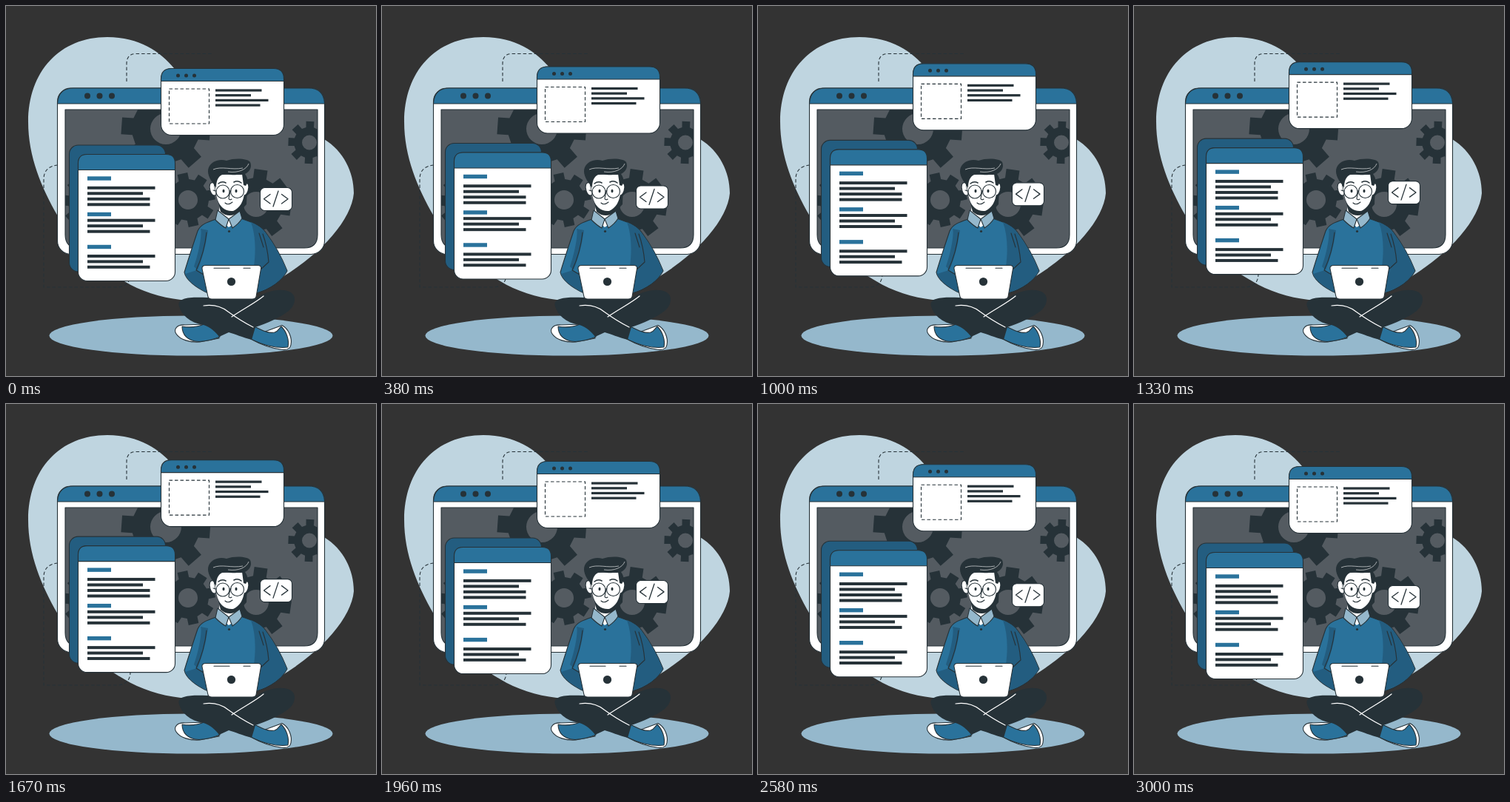
An HTML page for the animation above (3040 ms loop, 500 px wide and 500 px high).

```html
<!DOCTYPE html>
<html lang="en">
<head>
<meta charset="utf-8">
<title>Developer at work</title>
<style>
  html, body { margin: 0; width: 100%; height: 100%; overflow: hidden; background: #333; }
  svg { display: block; width: 100vw; height: 100vh; }
  .ink { fill: #263238; }
  .blue { fill: #2a729b; }
  .deep { fill: #235d80; }
  .pale { fill: #95b8cc; }
  .white { fill: #fff; }
  .line { fill: none; }
  .edge, .line { stroke: #263238; stroke-width: 1.1; stroke-linecap: round; stroke-linejoin: round; }
  .dash { fill: none; stroke: #263238; stroke-width: 1.1; stroke-dasharray: 4.5 3; }
</style>
</head>
<body>
<svg viewBox="0 0 500 500">
  <defs>
    <clipPath id="screen"><path d="M80 140H421V309Q421 327 403 327H98Q80 327 80 309Z"/></clipPath>
  </defs>

  <!-- backdrop -->
  <path fill="#bfd5e0" d="M30 157C30 88 73 42 137 42C180 42 209 62 227 84C270 140 395 158 430 180C456 196 470 224 470 253C467 288 428 333 374 366C335 391 285 400 236 397C209 394 181 385 160 372C120 350 91 320 70 284C48 246 30 203 30 157Z"/>
  <path class="dash" d="M163 102V78Q163 64.500 176 64.500H280"/>
  <path class="dash" d="M70 215Q51 217 51 234V380H152Q168 378 168 362V300"/>
  <ellipse class="pale" cx="250" cy="445.500" rx="191.500" ry="27"/>

  <!-- monitor -->
  <rect class="white edge" x="69.500" y="111" width="361" height="224.500" rx="18"/>
  <path class="blue edge" d="M69.500 132V131Q71 111 91 111H409Q429 111 430.500 131V132Z"/>
  <g class="ink"><circle cx="110" cy="121.500" r="4"/><circle cx="126.500" cy="121.500" r="4"/><circle cx="143" cy="121.500" r="4"/></g>
  <g clip-path="url(#screen)">
    <rect x="80" y="140" width="341" height="187" fill="#545b61"/>
    <path id="gears" class="ink" fill-rule="evenodd"/>
  </g>
  <path class="line" d="M80 140H421V309Q421 327 403 327H98Q80 327 80 309Z"/>

  <!-- floating windows -->
  <g id="float">
    <rect class="deep edge" x="85.500" y="188" width="130" height="171" rx="12"/>
    <rect class="white edge" x="97.500" y="200.500" width="131" height="171" rx="12"/>
    <path class="blue edge" d="M97.500 221.500V212.500Q97.500 200.500 109.500 200.500H216.500Q228.500 200.500 228.500 212.500V221.500Z"/>
    <rect class="white edge" x="209.500" y="84.500" width="166" height="90" rx="14"/>
    <path class="blue edge" d="M209.500 101.500V98.500Q209.500 84.500 223.500 84.500H361.500Q375.500 84.500 375.500 98.500V101.500Z"/>
    <g class="ink"><circle cx="232.500" cy="94" r="2.500"/><circle cx="243.500" cy="94" r="2.500"/><circle cx="254.500" cy="94" r="2.500"/></g>
    <rect class="dash" x="220.500" y="112" width="54" height="47"/>
    <g id="bars"></g>
    <rect class="white edge" x="343.500" y="245.500" width="43" height="31" rx="6"/>
    <path class="line" style="stroke-width:1.300" d="M357 254.500L348.500 260.800L357 267M368 250L361 271M372.500 254.500L381 260.800L372.500 267"/>
  </g>

  <!-- shoes and legs -->
  <path class="white edge" d="M242 431C231 430 226 437 230 443C235 451 249 455 262 454L288 449L270 430Z"/>
  <path class="blue edge" d="M270 429C259 434 249 435 238 433C238 444 245 453 261 453.500C271 453 280 451 289 447L286 436Z"/>
  <path class="white edge" d="M373 431.500C382 436 387 449 385 458C384 463 380 465 374 464.500C360 463 345 458 331 450L350 440Z"/>
  <path class="blue edge" d="M335 433C345 437 353 443 363 441C369 439 369 435 372 433C379 440 383 451 381 461C365 463 346 458 331 450Z"/>
  <path class="ink" d="M234 406C230 394 249 393 272 394L338 395C351 385 371 381 383 386C394 391 391 405 382 412C371 421 352 429 337 434L332 451C320 448 309 443 301 441L288 447C283 440 276 434 267 431C248 428 237 417 234 406Z"/>
  <path fill="none" stroke="#fff" stroke-width="1.200" stroke-linecap="round" d="M267 405C281 403 291 406 300 413C311 421 322 428 334 434M348 392C337 401 323 408 305 420"/>

  <!-- sweater -->
  <path class="blue edge" d="M284 288C272 292 263 295 259 304C253 322 246 343 241 360C243 370 257 381 273 388H338C357 383 373 371 380 358C373 340 363 322 351 306C344 296 332 292 317 287Z"/>
  <path class="deep" d="M263 301C265 306 262 329 254 352L259 357C265 341 270 325 273 303ZM242 362C247 373 259 381 272 387L268 364L258 357ZM331 292C337 309 338 330 335 352H344L338 387C358 382 373 370 379.500 358C372 339 362 321 350 306C345 299 338 295 331 292Z"/>
  <path class="line" d="M271 306C269 326 264 342 257 357L267 363M342 307L348 326M347 308C352 322 354 334 355 346L342 358"/>
  <circle class="ink" cx="301.500" cy="304.500" r="1.600"/>

  <!-- head -->
  <path class="white" d="M289 270H315L317 288L301 299L286 286Z"/>
  <path class="ink" d="M286 262L290 278C299 286 308 283 315 279L325 268L326 242H316Z"/>
  <path class="white edge" d="M281 239C275 237 274 244 276 250C278 256 281 257 284 255ZM322 240C328 237 329 244 327 250C325 256 322 257 319 255Z"/>
  <path class="white" d="M283 228H322L322 253C321 264 316 273 307 277C297 278 289 272 286 262C283 252 281 241 283 228Z"/>
  <path class="ink" d="M281 241C275 234 271 225 274 218C278 209 289 206 298 209C309 205 327 206 330 211C333 218 329 224 323 227C328 234 327 239 324 243L321 242L319 227C308 230 299 226 292 228C286 231 284 237 284 246Z"/>
  <path fill="none" stroke="#fff" stroke-width=".6" d="M280 221C291 216 305 222 320 219M300 224C314 226 325 221 328 213"/>
  <path class="line" style="stroke-width:1.600" d="M287 240Q292 236 297 239M308 238Q313 235 318 239"/>
  <path class="line" d="M303 250L301 260Q302 263 305 261M296 266Q300 270 306 265M302.500 250Q303 249 304 250M280 249L284 250"/>
  <g class="line"><circle cx="293" cy="251" r="9"/><circle cx="312.500" cy="250.500" r="9"/></g>
  <g class="ink"><ellipse cx="294" cy="250" rx="1.500" ry="2.200"/><ellipse cx="311" cy="250" rx="1.500" ry="2.200"/></g>
  <path class="pale edge" d="M286 276L301 288L297 300C291 297 287 293 283 289ZM316 277L301 288L306 300C312 296 316 292 319 287Z"/>

  <!-- laptop -->
  <path class="white edge" d="M269 350.500H340Q345.500 350.500 344.500 355L338 393Q337 396 333 396H278Q274 396 273 393L265 355Q264.500 351 269 350.500Z"/>
  <path class="line" d="M281 354.200H302M321 354.200H330"/>
  <circle class="ink" cx="304.500" cy="372.500" r="5.600"/>
</svg>
<script>
const $ = id => document.getElementById(id);

// Toothed ring with a round hole; turn is in degrees.
function gear(x, y, outer, root, hole, turn, teeth = 8) {
  const step = 2 * Math.PI / teeth, points = [];
  for (let i = 0; i < teeth; i++)
    for (const [r, a] of [[root, -.32], [outer, -.24], [outer, .24], [root, .32]]) {
      const angle = turn * Math.PI / 180 + (i + a) * step;
      points.push(`${x + r * Math.cos(angle)} ${y + r * Math.sin(angle)}`);
    }
  return `M${points.join('L')}ZM${x - hole} ${y}a${hole} ${hole} 0 1 0 ${2 * hole} 0a${hole} ${hole} 0 1 0 ${-2 * hole} 0Z`;
}

$('gears').setAttribute('d', [
  [216, 166, 61, 46, 21, 4],
  [246, 262, 37, 28, 13, -12],
  [338, 268, 48, 36, 17, 8],
  [410, 184.5, 29, 21, 10, 2],
  [112, 265, 37, 28, 13, 4]
].map(g => gear(...g)).join(''));

const bar = (x, y, width, height, color) =>
  `<rect class="${color}" x="${x}" y="${y - height / 2}" width="${width}" height="${height}"/>`;
const rows = (x, y, step, height, widths) =>
  widths.map((w, i) => bar(x, y + i * step, w, height, 'ink')).join('');

$('bars').innerHTML =
  [233, 281.5, 325.5].map(y => bar(110, y, 32, 5.4, 'blue')).join('') +
  rows(110, 245.8, 7.5, 4, [91.5, 75, 84.5, 84.5]) +
  rows(110, 289.7, 7.5, 4, [91.5, 75, 84.5]) +
  rows(110, 338, 7.4, 4, [91.5, 75, 84.5]) +
  rows(283, 114, 6.7, 3.2, [62.5, 48, 71.5, 60.5]);

const LOOP = 3040, CYCLE = 3000, RISE = 10;

function draw() {
  const phase = Math.min(performance.now() % LOOP / CYCLE, 1);
  const lift = RISE * (1 - Math.abs(1 - 2 * phase));
  $('float').setAttribute('transform', `translate(0 ${-lift})`);
  requestAnimationFrame(draw);
}
draw();
</script>
</body>
</html>
```
